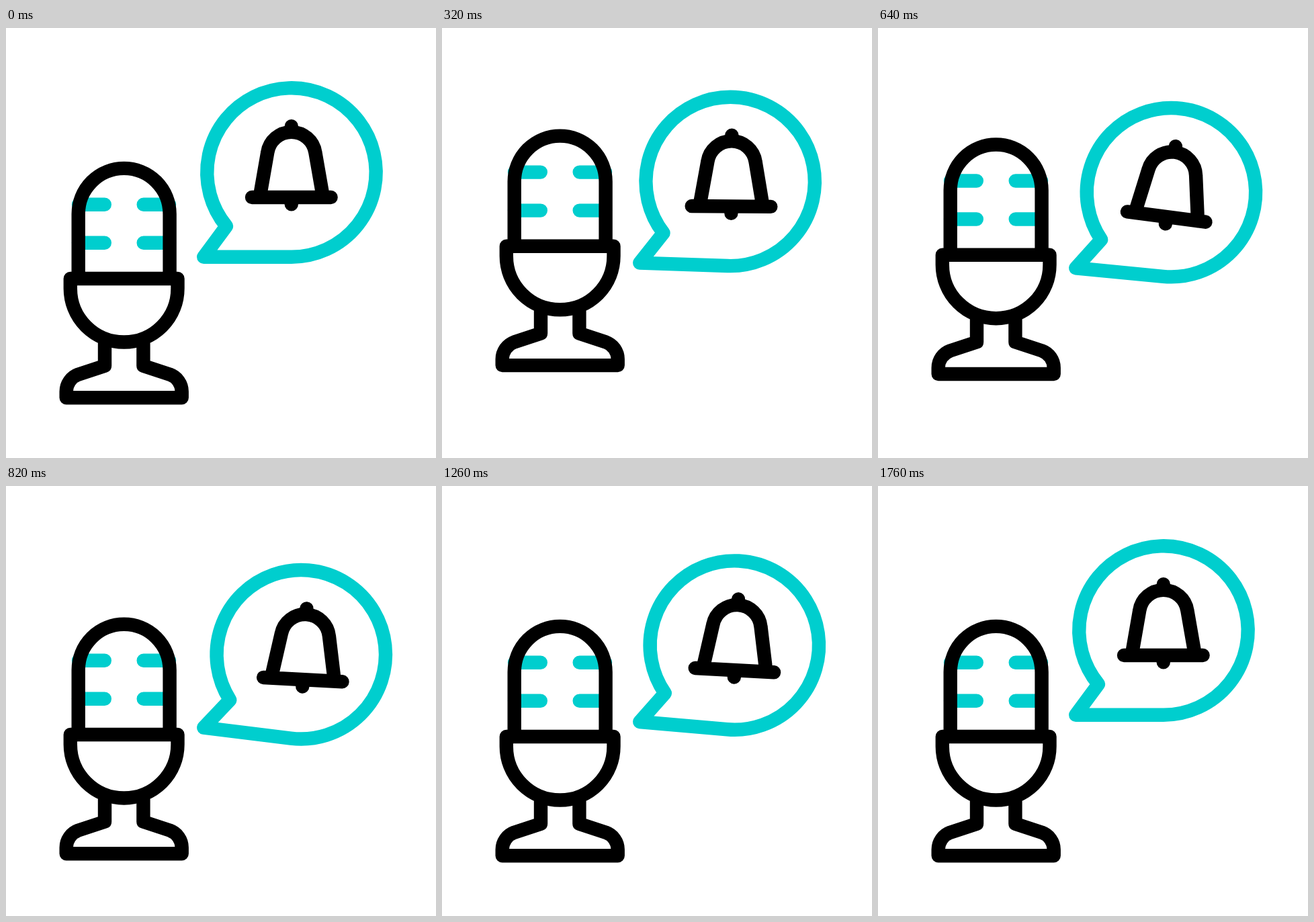
These frames come from a looping animation (640x640 px, 1800 ms). An HTML page with a canvas:

```html
<!DOCTYPE html>
<html lang="en">
<head>
<meta charset="utf-8">
<title>Microphone and bell</title>
<style>
  html, body { margin: 0; width: 100%; height: 100%; overflow: hidden; background: #fff; }
  canvas { display: block; width: 640px; height: 640px; }
</style>
</head>
<body>
<canvas id="stage" width="640" height="640"></canvas>
<script>
const ctx = document.getElementById('stage').getContext('2d');
const LOOP = 1800, STEP = 20, HALF = 890;
const BLACK = '#000', TEAL = '#00cece', WIDTH = 20.4;
const TIP = [294.2, 340.7], KNOB = [424.8, 146.2];

const mic = {
  bars: new Path2D('M108 262.8H146.8M108 319.8H146.8M204.7 262.8H243M204.7 319.8H243'),
  body: new Path2D('M107.7 373V276.8A67.95 67.95 0 0 1 243.6 276.8V373'),
  cup: new Path2D('M95.8 373H255.5V387.7A79.85 79.85 0 0 1 95.8 387.7Z'),
  foot: new Path2D('M147 467V502.7L107.5 515.7A27 27 0 0 0 89.7 541V550.3H261.7V541' +
    'A27 27 0 0 0 243.9 515.7L204.4 502.7V467')
};
const bubble = new Path2D('M294.2 340.7L328 295A125.7 125.7 0 1 1 424.9 340.7Z');
const bell = new Path2D('M366 252H483.6M377.6 252L389.2 185.5A36 36 0 0 1 460.4 185.5L472 252');

// Eased progress along a unit cubic Bezier
function bezier(x1, y1, x2, y2) {
  const at = (a, b, u) => 3 * a * u * (1 - u) ** 2 + 3 * b * u * u * (1 - u) + u ** 3;
  return x => {
    if (x <= 0) return 0;
    if (x >= 1) return 1;
    let lo = 0, hi = 1;
    for (let i = 0; i < 30; i++) {
      const mid = (lo + hi) / 2;
      if (at(x1, x2, mid) < x) lo = mid; else hi = mid;
    }
    return at(y1, y2, lo);
  };
}
const smooth = bezier(1 / 3, 0, 2 / 3, 1);
const soft = bezier(0.42, 0, 0.58, 1);
const settle = bezier(1 / 6, 1 / 6, 2 / 3, 1);
const fall = bezier(1 / 3, 0, 0.5, 1);

// Rise to 1 at the peak, then back to 0 at the end
function hump(t, peak, end, up, down = up) {
  return t < peak ? up(t / peak) : 1 - down((t - peak) / (end - peak));
}

const SWINGS = [0, 0.5, -4.4, 2.2, -5.8, 2.4, -3.4, 2.4, 0];
function swing(t) {
  const pos = t / (HALF / 4);
  const i = Math.min(Math.floor(pos), SWINGS.length - 2);
  return SWINGS[i] + (SWINGS[i + 1] - SWINGS[i]) * smooth(pos - i);
}

function turn([x, y], deg) {
  ctx.translate(x, y);
  ctx.rotate(deg * Math.PI / 180);
  ctx.translate(-x, -y);
}

function line(path, color) {
  ctx.strokeStyle = color;
  ctx.stroke(path);
}

function dot(x, y) {
  ctx.fillStyle = BLACK;
  ctx.beginPath();
  ctx.arc(x, y, WIDTH / 2, 0, Math.PI * 2);
  ctx.fill();
}

function drawMic(t) {
  ctx.save();
  ctx.translate(0, -57.8 * hump(t, 446, 892, soft));
  line(mic.bars, TEAL);
  ctx.lineCap = 'butt';
  for (const part of [mic.body, mic.cup, mic.foot]) line(part, BLACK);
  ctx.restore();
}

function drawBubble(t) {
  ctx.save();
  ctx.translate(0, 19.2 * hump(t, HALF, HALF * 2, settle, fall));
  turn(TIP, 7.35 * hump(t, 950, 1760, smooth));
  line(bubble, TEAL);
  turn(KNOB, swing(t));
  line(bell, BLACK);
  dot(...KNOB);
  dot(424.8, 262.4);
  ctx.restore();
}

function draw(t) {
  ctx.fillStyle = '#fff';
  ctx.fillRect(0, 0, 640, 640);
  ctx.lineWidth = WIDTH;
  ctx.lineCap = ctx.lineJoin = 'round';
  drawMic(t);
  drawBubble(t);
}

const start = performance.now();
function tick() {
  const t = (performance.now() - start) % LOOP;
  const held = Math.floor(t / STEP) * STEP;
  draw(held >= 1760 ? 0 : held);
  requestAnimationFrame(tick);
}
tick();
</script>
</body>
</html>
```
